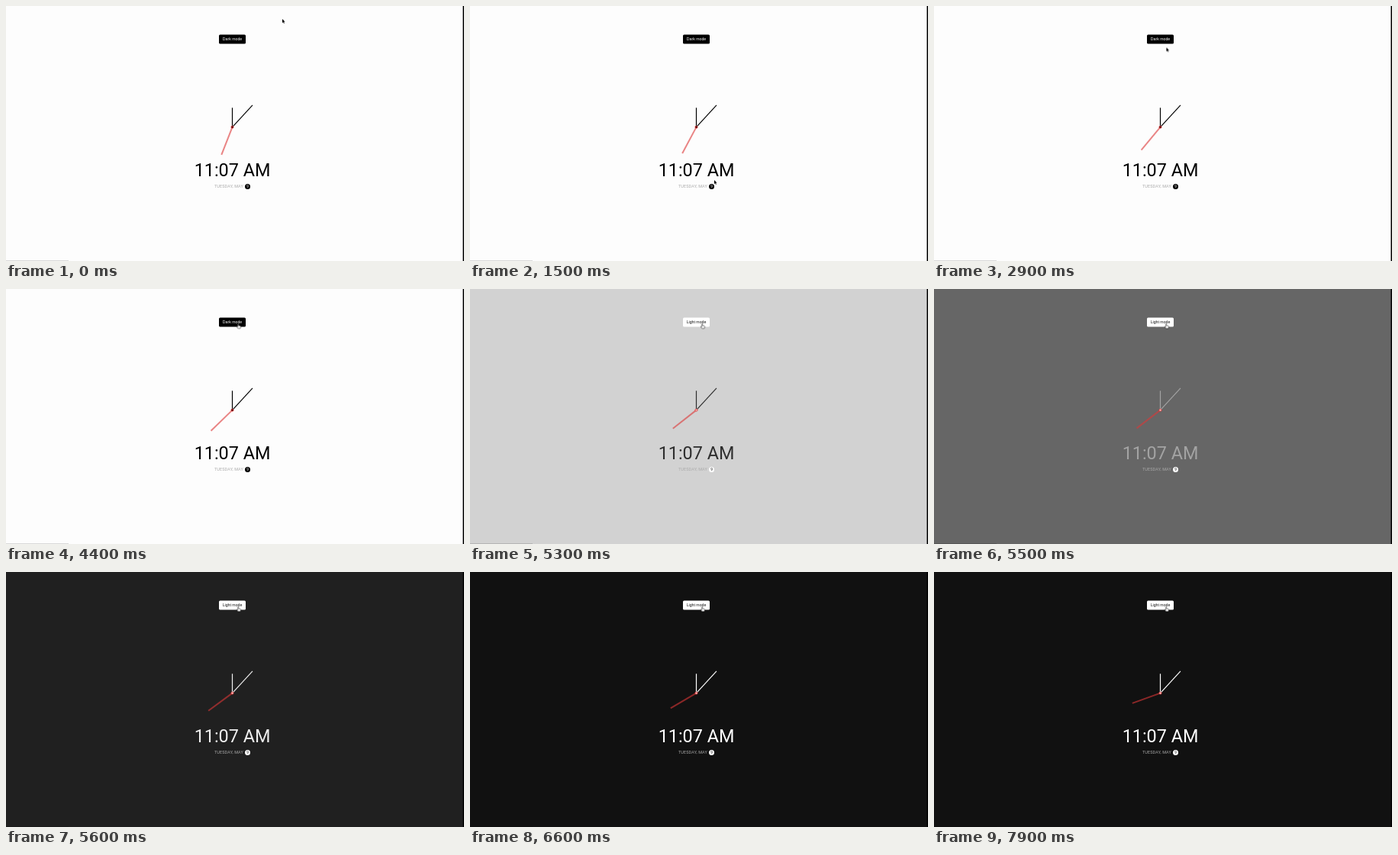
Recreate the animation shown at these times as an HTML page. Size 600 by 334 pixels, loop 8 s.

```html
<!DOCTYPE html>
<html lang="en">
<head>
<meta charset="utf-8">
<title>Theme clock</title>
<style>
html, body { margin: 0; width: 100%; height: 100%; overflow: hidden; }
svg { display: block; width: 600px; height: 334px; color: #000; background: #fdfdfd; animation: theme 8s infinite; }
text { text-anchor: middle; }
.time { font: 23.4px Roboto, sans-serif; }
.date { font: 5.46px Roboto, sans-serif; letter-spacing: .117px; text-anchor: start; }
.day { font: 4.7px Roboto, sans-serif; }
.label { font: 5.2px "Liberation Sans", Arial, sans-serif; }

.light { animation: hide 8s step-end infinite; }
.dark { animation: show 8s step-end infinite; }
.seconds { animation: count 8s steps(8, end) infinite; }
.tick { animation: tick 1s infinite; }
.cursor { animation: move 8s linear infinite; }
.arrow { animation: leave 8s step-end infinite; }
.hand { animation: enter 8s step-end infinite; }

@keyframes theme {
  0% { background: #fdfdfd; color: #000; }
  64% { background: #fdfdfd; color: #000; animation-timing-function: ease-in; }
  70.25%, 100% { background: #111; color: #fff; }
}
@keyframes hide { 0% { opacity: 1; } 64%, 100% { opacity: 0; } }
@keyframes show { 0% { opacity: 0; } 64%, 100% { opacity: 1; } }
@keyframes leave { 0% { opacity: 1; } 38.5%, 100% { opacity: 0; } }
@keyframes enter { 0% { opacity: 0; } 38.5%, 100% { opacity: 1; } }

/* The clock maps 0-59 onto a full turn, so each second is 360/59 degrees. */
@keyframes count {
  from { transform: rotate(calc(360deg / 59 * 33)); }
  to { transform: rotate(calc(360deg / 59 * 41)); }
}
@keyframes tick {
  0% { transform: rotate(0deg); }
  37% { transform: rotate(0deg); animation-timing-function: ease-in; }
  87%, 100% { transform: rotate(calc(360deg / 59)); }
}
@keyframes move {
  0% { transform: translate(362px, 17px); animation-timing-function: ease-in-out; }
  11.25% { transform: translate(345px, 222px); }
  15% { transform: translate(332px, 234px); }
  18.75% { transform: translate(320px, 228px); }
  22.5% { transform: translate(313px, 211px); animation-timing-function: ease-in-out; }
  33.75% { transform: translate(305px, 62px); }
  36.25% { transform: translate(304.4px, 54.4px); }
  39% { transform: translate(304px, 48.5px); }
  45% { transform: translate(304.2px, 46px); }
  50%, 100% { transform: translate(304.2px, 45.6px); }
}
</style>
</head>
<body>
<svg viewBox="0 0 600 334">
  <g class="light">
    <rect x="279" y="37.6" width="35" height="12" rx="1.5" fill="#000"/>
    <text class="label" x="296.5" y="45.4" fill="#fff">Dark mode</text>
  </g>
  <g class="dark">
    <rect x="279" y="37.6" width="35" height="12" rx="1.5" fill="#fff"/>
    <text class="label" x="296.5" y="45.4" fill="#111">Light mode</text>
  </g>

  <g transform="translate(296.5 158.6)">
    <rect x="-.6" y="-25.3" width="1.2" height="25.3" fill="currentColor"/>
    <rect x="-.6" y="-39" width="1.2" height="39" fill="currentColor" transform="rotate(42.71)"/>
    <g class="seconds"><g class="tick">
      <rect x="-.6" y="-39" width="1.2" height="39" fill="#dd3535"/>
    </g></g>
    <circle r="1.95" fill="#dd3535"/>
    <circle class="light" r="1" fill="#000"/>
    <circle class="dark" r="1" fill="#fff"/>
  </g>

  <text class="time" x="296.5" y="222.6" fill="currentColor">11:07 AM</text>
  <text class="date" x="273" y="238.3" fill="#aaa">TUESDAY, MAY</text>
  <g class="light">
    <circle cx="316.5" cy="236.4" r="3.5" fill="#000"/>
    <text class="day" x="316.5" y="238.1" fill="#fff">9</text>
  </g>
  <g class="dark">
    <circle cx="316.5" cy="236.4" r="3.5" fill="#fff"/>
    <text class="day" x="316.5" y="238.1" fill="#111">9</text>
  </g>

  <rect y="333" width="82" height="1" fill="#000" opacity=".14"/>
  <rect x="598.5" width="1.5" height="334" fill="#000"/>

  <g class="cursor">
    <path class="arrow" d="M0 0V5.2L1.2 4.1 2 5.9 2.8 5.5 2 3.8H3.6Z" fill="#000" stroke="#fff" stroke-width=".6" paint-order="stroke"/>
    <path class="hand" d="M-.6 .5a.6 .6 0 0 1 1.2 0V2.3L2.6 2.7Q3.4 3 3.3 4L2.8 6H-.4L-2 3.8Q-1.9 3-1.2 3.3L-.6 3.8Z" fill="#fff" stroke="#000" stroke-width=".5"/>
  </g>
</svg>
</body>
</html>
```
